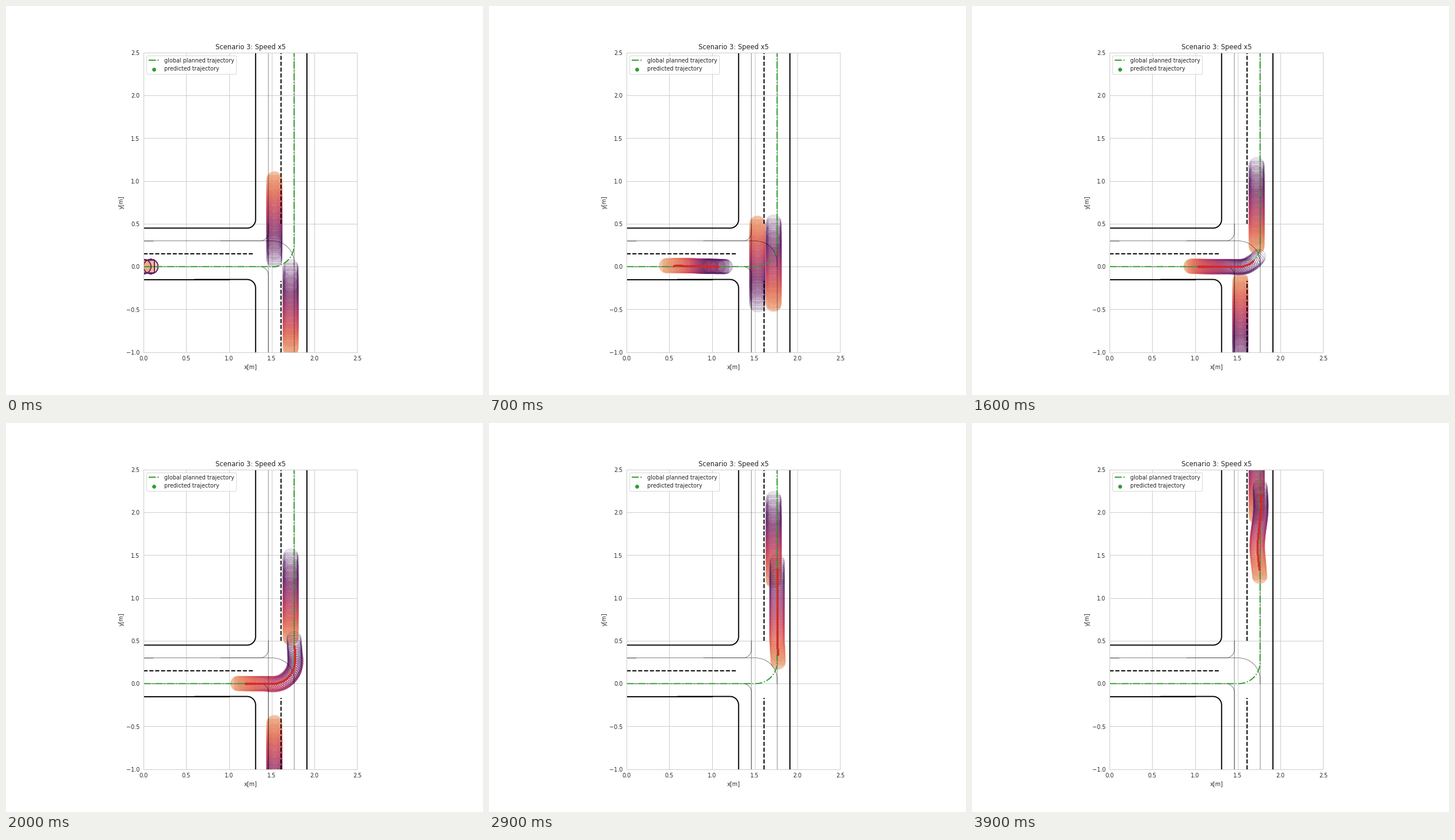
A matplotlib script that plays this animation: 829x675 px, repeating every 4000 ms.

```python
import matplotlib.pyplot as plt
import numpy as np
from matplotlib.animation import FuncAnimation
from matplotlib.collections import PolyCollection
from matplotlib.colors import LinearSegmentedColormap

WIDTH, HEIGHT, DPI = 829, 675, 69
FRAMES, INTERVAL = 40, 100
STEPS = 50            # prediction steps, five per frame
AHEAD = np.arange(STEPS + 1) / 5
GREEN, RED = "tab:green", "tab:red"

plt.rcParams.update({
    "font.family": "DejaVu Sans",
    "font.size": 10,
    "axes.edgecolor": "0.8",
    "axes.linewidth": 1,
    "axes.axisbelow": True,
    "axes.grid": True,
    "grid.color": "0.8",
    "grid.linewidth": 1,
    "text.color": "0.15",
    "axes.labelcolor": "0.15",
    "axes.titlecolor": "0.15",
    "xtick.color": "0.15",
    "ytick.color": "0.15",
    "xtick.major.size": 0,
    "ytick.major.size": 0,
    "xtick.major.pad": 7,
    "ytick.major.pad": 7,
})

FLARE = LinearSegmentedColormap.from_list("flare", [
    "#edb081", "#e98d6b", "#e3685c", "#d14a61",
    "#b13c6c", "#8f3371", "#6c2b6d", "#4b2362"])


def arc(cx, cy, r, start, end, n=30):
    a = np.radians(np.linspace(start, end, n))
    return np.column_stack([cx + r * np.cos(a), cy + r * np.sin(a)])


def bump(x, mid, width, power=2):
    return np.exp(-np.abs((x - mid) / width) ** power)


def draw(*parts, **style):
    xy = np.vstack([np.atleast_2d(p) for p in parts])
    ax.plot(xy[:, 0], xy[:, 1], **style)


# --- ego motion -----------------------------------------------------------

CRUISE = 0.1          # distance per frame
TURN_X, TURN_R = 1.51, 0.25
TURN_LEN = TURN_R * np.pi / 2


def ego_speed(t):
    """Pull away, slow down before the turn, cruise, ease off at the end."""
    return (CRUISE * np.clip(t / 3, 0, 1) - 0.066 * bump(t, 15.5, 6.37, 4)
            - 0.021 * np.clip((t - 42) / 2, 0, 1))


CLOCK = np.linspace(0, FRAMES + AHEAD[-1], 1001)
TRAVEL = np.cumsum(ego_speed(CLOCK)) * CLOCK[1]


def path_point(s):
    """Point on the planned path at distance s."""
    a = np.clip((s - TURN_X) / TURN_R, 0, np.pi / 2)
    x = np.minimum(s, TURN_X) + TURN_R * np.sin(a)
    y = TURN_R * (1 - np.cos(a)) + np.maximum(s - TURN_X - TURN_LEN, 0)
    return np.column_stack([x, y])


def tangent(curve, s, eps=0.02):
    d = curve(s + eps) - curve(s - eps)
    return d / np.hypot(d[:, 0], d[:, 1])[:, None]


def ego_curve(s, swerve):
    """Driven path: planned path plus small deviations to the left."""
    side = (0.012 * bump(s, 0.6, 0.35) - 0.01 * bump(s, 1.95, 0.15)
            + swerve * (0.031 * bump(s, 3.26, 0.27) - 0.01 * bump(s, 3.7, 0.2)))
    t = tangent(path_point, s)
    normal = np.column_stack([-t[:, 1], t[:, 0]])
    return path_point(s) + side[:, None] * normal


def ego_prediction(frame):
    s = np.interp(frame + AHEAD, CLOCK, TRAVEL) if frame else 0 * AHEAD
    swerve = np.clip((frame - 33) / 6, 0, 1)
    curve = lambda d: ego_curve(d, swerve)
    return curve(s), tangent(curve, s)


def straight_prediction(x, y, speed, frame):
    """Constant vertical speed, in units per frame."""
    t = frame + AHEAD
    centers = np.column_stack([np.full(t.size, x), y + speed * t])
    return centers, np.tile([0, np.sign(speed)], (t.size, 1))


# --- vehicle footprints -----------------------------------------------------

UNIT_CIRCLE = arc(0, 0, 1, 0, 360, 49)[:-1]


def footprints(centers, headings, length, width=0.15):
    """Three covering circles and the body rectangle for each step."""
    offset = length / 3
    radius = np.hypot(length / 6, width / 2)
    shapes = []
    for c, h in zip(centers, headings):
        n = np.array([-h[1], h[0]])
        for k in (-1, 0, 1):
            shapes.append(c + k * offset * h + radius * UNIT_CIRCLE)
        a, b = h * length / 2, n * width / 2
        shapes.append(np.array([c - a - b, c + a - b, c + a + b, c - a + b]))
    return shapes


step_colors = FLARE(np.linspace(0.06, 0.99, STEPS + 1))
step_colors[:, 3] = np.linspace(0.6, 0.3, STEPS + 1)
edges = np.repeat(step_colors, 4, axis=0)
faces = edges.copy()
faces[:4, 3] = 0.5    # only the current pose is filled
faces[4:, 3] = 0


# --- static scene -----------------------------------------------------------

fig, ax = plt.subplots(figsize=((WIDTH + 1e-6) / DPI, (HEIGHT + 1e-6) / DPI),
                       dpi=DPI, facecolor="white")
ax.set_aspect("equal")
ax.set_xlim(0, 2.5)
ax.set_ylim(-1, 2.5)
ax.set_xticks(np.arange(0, 2.6, 0.5))
ax.set_yticks(np.arange(-1, 2.6, 0.5))
ax.set_title("Scenario 3: Speed x5")
ax.set_xlabel("x[m]")
ax.set_ylabel("y[m]")

border = dict(color="black", lw=2)
divider = dict(color="black", lw=2, ls="--")
center = dict(color="black", lw=0.5)

draw((0, .45), arc(1.21, .55, .1, -90, 0), (1.31, 2.5), **border)
draw((0, -.15), (1, -.15), **border)
draw((.6, -.15), arc(1.21, -.25, .1, 90, 0), (1.31, -1), **border)
draw((1.91, -1), (1.91, 2.5), **border)

draw((0, .15), (1.29, .15), **divider)
draw((1.61, .5), (1.61, 2.5), **divider)
draw((1.61, -1), (1.61, -.17), **divider)

draw((1.46, 2.5), (1.46, -1), **center)
draw((1.76, -1), (1.76, 2.5), **center)
draw((0, .3), (.11, .3), **center)
draw((0, .3), arc(1.36, .4, .1, -90, 0), (1.46, .5), **center)
draw((.9, .3), arc(1.51, .05, .25, 90, 0), (1.76, 0), **center)
draw((0, 0), arc(1.36, -.1, .1, 90, 0), (1.46, -1), **center)

draw((0, 0), arc(TURN_X, TURN_R, TURN_R, -90, 0), (1.76, 2.5),
     color=GREEN, lw=2, ls="-.", label="global planned trajectory")
ax.scatter([], [], color=GREEN, label="predicted trajectory")
ax.legend(loc="upper left")


# --- moving parts -----------------------------------------------------------

def vehicle():
    shapes = PolyCollection([], edgecolors=edges, facecolors=faces,
                            linewidths=1, zorder=1)
    ax.add_collection(shapes, autolim=False)
    return shapes


oncoming, crossing, ego = vehicle(), vehicle(), vehicle()
dots, = ax.plot([], [], ls="", marker="o", ms=4, mew=0, color=RED, zorder=3)


def update(frame):
    oncoming.set_verts(footprints(
        *straight_prediction(1.53, 0.92, -0.074, frame), 0.3))
    crossing.set_verts(footprints(
        *straight_prediction(1.72, -0.855, 0.0746, frame), 0.3))
    centers, headings = ego_prediction(frame)
    ego.set_verts(footprints(centers, headings, 0.25))
    shown = centers if frame else centers[:0]
    dots.set_data(shown[:, 0], shown[:, 1])
    return oncoming, crossing, ego, dots


anim = FuncAnimation(fig, update, frames=FRAMES, interval=INTERVAL,
                     repeat=True, repeat_delay=0, blit=False)
plt.show()
```
